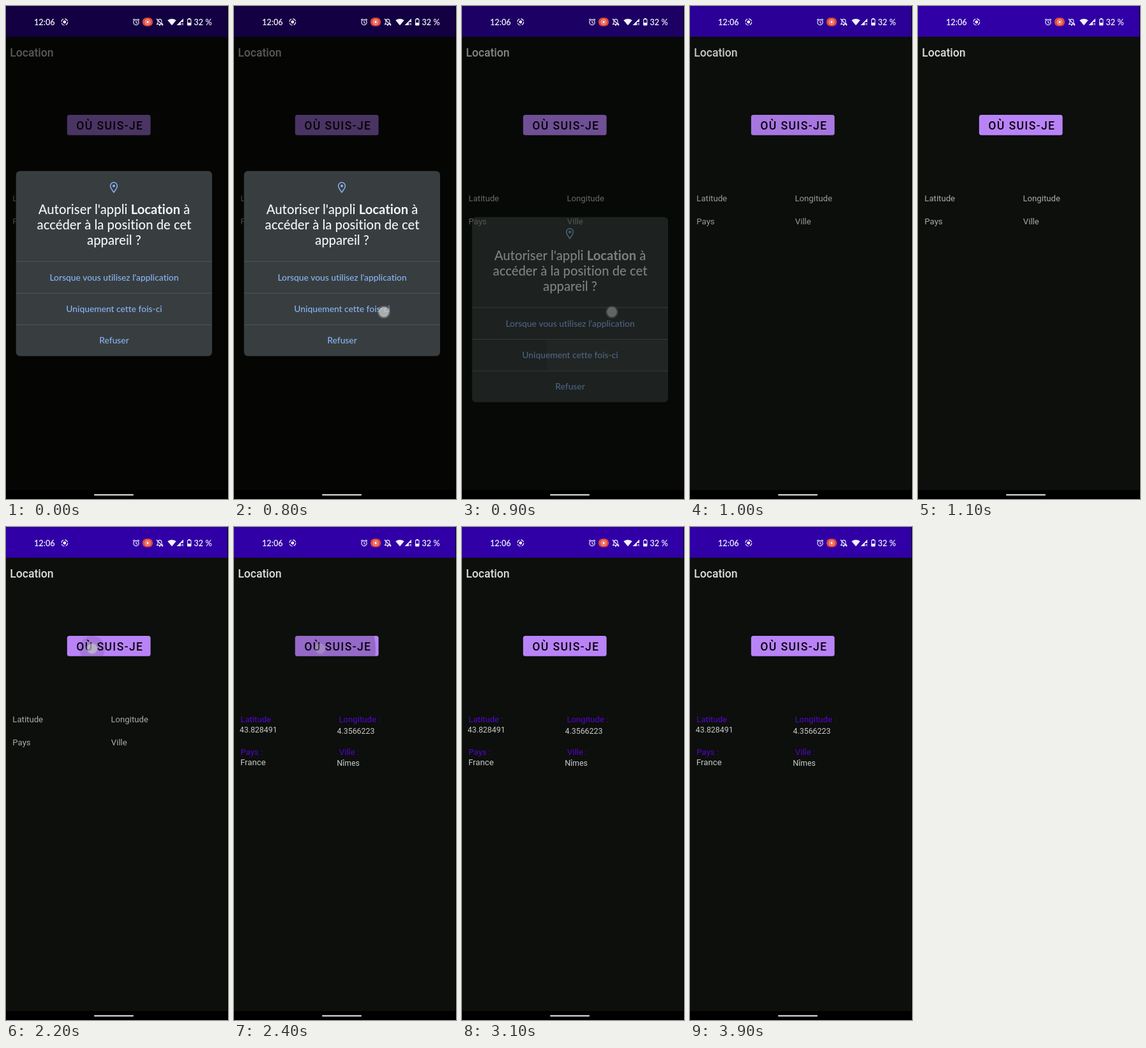
An HTML page with a canvas for the animation above (5600 ms loop, 348x770 px).

```html
<!DOCTYPE html>
<html lang="fr">
<head>
<meta charset="utf-8">
<style>
  html, body { margin: 0; width: 100%; height: 100%; overflow: hidden; background: #000; }
  canvas { display: block; width: 348px; height: 770px; }
</style>
</head>
<body>
<canvas id="stage"></canvas>
<script>
const W = 348, H = 770, LOOP = 5600, STEP = 100;
const canvas = document.getElementById('stage');
const ctx = canvas.getContext('2d');
const dpr = window.devicePixelRatio || 1;
canvas.width = W * dpr;
canvas.height = H * dpr;

const BLUE = '#8ab4f8';
const BUTTON = { x: 95.8, y: 170, w: 130.8, h: 31.7, r: 3.5 };
const DIALOG = { x: 15.7, y: 257.7, w: 307.3, h: 289, r: 6 };

// Linear interpolation through [time, value] pairs.
function track(t, keys) {
  if (t <= keys[0][0]) return keys[0][1];
  for (let i = 1; i < keys.length; i++) {
    const [t0, v0] = keys[i - 1], [t1, v1] = keys[i];
    if (t <= t1) return v0 + (v1 - v0) * (t - t0) / (t1 - t0);
  }
  return keys[keys.length - 1][1];
}

function rect(x, y, w, h, color) {
  ctx.fillStyle = color;
  ctx.fillRect(x, y, w, h);
}

function roundPath({ x, y, w, h, r }) {
  ctx.beginPath();
  ctx.roundRect(x, y, w, h, r);
}

function disc(x, y, r, color) {
  ctx.beginPath();
  ctx.arc(x, y, r, 0, Math.PI * 2);
  ctx.fillStyle = color;
  ctx.fill();
}

function ring(x, y, r, width, color) {
  ctx.beginPath();
  ctx.arc(x, y, r, 0, Math.PI * 2);
  ctx.lineWidth = width;
  ctx.strokeStyle = color;
  ctx.stroke();
}

function lines(color, width, ...paths) {
  ctx.beginPath();
  for (const [x, y, ...rest] of paths) {
    ctx.moveTo(x, y);
    for (let i = 0; i < rest.length; i += 2) ctx.lineTo(rest[i], rest[i + 1]);
  }
  ctx.lineWidth = width;
  ctx.strokeStyle = color;
  ctx.stroke();
}

function text(str, x, y, font, color, align = 'left') {
  ctx.font = font + ', sans-serif';
  ctx.fillStyle = color;
  ctx.textAlign = align;
  ctx.fillText(str, x, y);
}

function drawPage(located) {
  rect(0, 0, W, H, '#0c0f0b');
  rect(0, 0, 347, 48, '#3000a6');
  text('Location', 6.2, 78.7, '500 17.6px Roboto', '#dddfdd');

  const label = (str, x, y) =>
    text(located ? str + ' :' : str, x, y, '13.2px Roboto', located ? '#5603cd' : '#a9aba9');
  const row2 = located ? 356 : 341;
  label('Latitude', 10.3, 305.3);
  label('Longitude', 164.4, 305.3);
  label('Pays', 10.3, row2);
  label('Ville', 164.8, row2);

  if (located) {
    const value = '#c8cac8';
    text('43.828491', 8.7, 321.3, '12.4px Roboto', value);
    text('4.3566223', 161.5, 322.5, '12.4px Roboto', value);
    text('France', 10, 371.7, '13.2px Roboto', value);
    text('Nîmes', 161.2, 373.3, '12.4px Roboto', value);
  }
}

function drawButton(t) {
  roundPath(BUTTON);
  ctx.fillStyle = '#b983f8';
  ctx.fill();

  const strength = track(t, [[2100, 0], [2200, .1], [2300, .2], [2400, .2], [2700, 0]]);
  if (strength > 0) {
    ctx.save();
    roundPath(BUTTON);
    ctx.clip();
    const radius = track(t, [[2200, 20], [2400, 87], [2500, 110]]);
    disc(135, 190, radius, `rgba(0,0,0,${strength})`);
    ctx.restore();
  }

  ctx.letterSpacing = '1.4px';
  text('OÙ SUIS-JE', 110.2, 192.6, '500 17.6px Roboto', '#08040d');
  ctx.letterSpacing = '0px';
}

function drawPin(x, y) {
  ctx.beginPath();
  ctx.moveTo(x, y + 10);
  ctx.bezierCurveTo(x - 3, y + 6, x - 5.4, y + 3, x - 5.4, y);
  ctx.arc(x, y, 5.4, Math.PI, 0);
  ctx.bezierCurveTo(x + 5.4, y + 3, x + 3, y + 6, x, y + 10);
  ctx.closePath();
  ctx.lineWidth = 1.5;
  ctx.strokeStyle = BLUE;
  ctx.stroke();
  disc(x, y, 2, BLUE);
}

function drawDialog(shift, alpha, pressed) {
  ctx.save();
  ctx.translate(0, shift);
  ctx.globalAlpha = alpha;
  roundPath(DIALOG);
  ctx.fillStyle = '#383e3f';
  ctx.fill();
  if (pressed) rect(133, 449, 190, 48, 'rgba(255,255,255,.04)');
  for (const y of [398.5, 448, 497.5]) rect(16, y, 307, 1, '#505657');
  drawPin(169, 281);

  ctx.letterSpacing = '0.01px'; // turns ligatures off
  const white = '#f4f6f6', regular = '500 20.3px Lato', bold = 'bold 20.3px Lato';
  const parts = [["Autoriser l'appli ", regular], ['Location', bold], [' à', regular]];
  const widths = parts.map(([str, font]) => {
    ctx.font = font + ', sans-serif';
    return ctx.measureText(str).width;
  });
  let x = 169.5 - widths.reduce((a, b) => a + b) / 2;
  parts.forEach(([str, font], i) => {
    text(str, x, 324.7, font, white);
    x += widths[i];
  });
  text('accéder à la position de cet', 169.5, 348.8, regular, white, 'center');
  text('appareil ?', 169.5, 372.9, regular, white, 'center');

  const choices = ["Lorsque vous utilisez l'application", 'Uniquement cette fois-ci', 'Refuser'];
  choices.forEach((str, i) =>
    text(str, 169.5, 428.7 + i * 49.3, '500 13.8px Lato', BLUE, 'center'));
  ctx.restore();
}

function drawStatusIcons() {
  const white = '#f4f2fa', red = '#e2493a';
  text('12:06', 44, 29.8, '600 12.7px Lato', white);
  text('32 %', 294.5, 29.8, '600 12.7px Lato', white);

  ctx.setLineDash([5.6, 2.05]);
  ring(91.8, 25, 4.9, 1.1, white);
  ctx.setLineDash([]);
  disc(91.8, 25, 2.4, white);

  // Alarm
  ring(204, 25.5, 4.1, 1.2, white);
  lines(white, 1.1, [204, 23, 204, 26, 206, 27], [199, 22, 201.5, 20], [206.5, 20, 209, 22]);

  // Screen recording
  roundPath({ x: 214, y: 18.2, w: 16, h: 13.4, r: 6 });
  ctx.fillStyle = red;
  ctx.fill();
  ring(222, 25, 3.9, .8, '#fbdcd8');
  disc(222, 25, 1.9, white);

  // Muted bell
  ctx.beginPath();
  ctx.moveTo(236.5, 28.5);
  ctx.lineTo(238, 27);
  ctx.lineTo(238, 24);
  ctx.bezierCurveTo(238, 19.5, 244, 19.5, 244, 24);
  ctx.lineTo(244, 27);
  ctx.lineTo(245.5, 28.5);
  ctx.closePath();
  ctx.lineWidth = 1.1;
  ctx.strokeStyle = white;
  ctx.stroke();
  lines(white, 1.2, [236, 20, 246, 30.5]);
  disc(241, 30, 1.1, white);

  // Wi-Fi
  ctx.beginPath();
  ctx.moveTo(260, 30.3);
  ctx.lineTo(253.3, 22.3);
  ctx.quadraticCurveTo(260, 17.5, 266.7, 22.3);
  ctx.closePath();
  ctx.fillStyle = white;
  ctx.fill();

  // Mobile signal
  ctx.beginPath();
  ctx.moveTo(267.5, 30);
  ctx.lineTo(278, 19.5);
  ctx.lineTo(278, 25);
  ctx.lineTo(274, 25);
  ctx.lineTo(274, 30);
  ctx.closePath();
  ctx.fill();
  lines(white, 1, [275, 26.5, 278, 29.8], [278, 26.5, 275, 29.8]);

  // Battery
  rect(286, 19, 2.6, 2, white);
  roundPath({ x: 284.6, y: 20.6, w: 5.4, h: 9.4, r: .8 });
  ctx.lineWidth = 1.1;
  ctx.strokeStyle = white;
  ctx.stroke();
  rect(284.6, 26, 5.4, 4, white);
}

function drawTouch(x, y, alpha) {
  ctx.save();
  ctx.globalAlpha = alpha;
  disc(x, y, 10.3, 'rgba(150,154,154,.35)');
  disc(x, y, 8, 'rgba(208,211,210,.68)');
  ctx.restore();
}

function draw(t) {
  ctx.setTransform(dpr, 0, 0, dpr, 0, 0);
  drawPage(t >= 2400);
  drawButton(t);

  const scrim = track(t, [[800, .6], [900, .4], [1000, .1], [1100, 0]]);
  rect(0, 0, W, H, `rgba(0,0,0,${scrim})`);
  if (t < 1000) {
    const leaving = track(t, [[800, 0], [900, 1]]);
    drawDialog(72 * leaving, 1 - .55 * leaving, leaving > 0);
  }

  rect(0, 756, W, 14, '#000');
  rect(347, 0, 1, H, '#000');
  roundPath({ x: 138, y: 762.6, w: 62, h: 2, r: 1 });
  ctx.fillStyle = '#f2f2f2';
  ctx.fill();
  drawStatusIcons();

  if (t >= 800 && t < 1000) drawTouch(235, 478, track(t, [[800, 1], [900, .45]]));
  if (t >= 2200 && t < 2500) drawTouch(135, 190, track(t, [[2200, .8], [2300, .8], [2400, .35]]));
}

const start = performance.now();
function tick() {
  const t = (performance.now() - start) % LOOP;
  draw(Math.floor(t / STEP) * STEP);
  requestAnimationFrame(tick);
}
tick();
</script>
</body>
</html>
```
